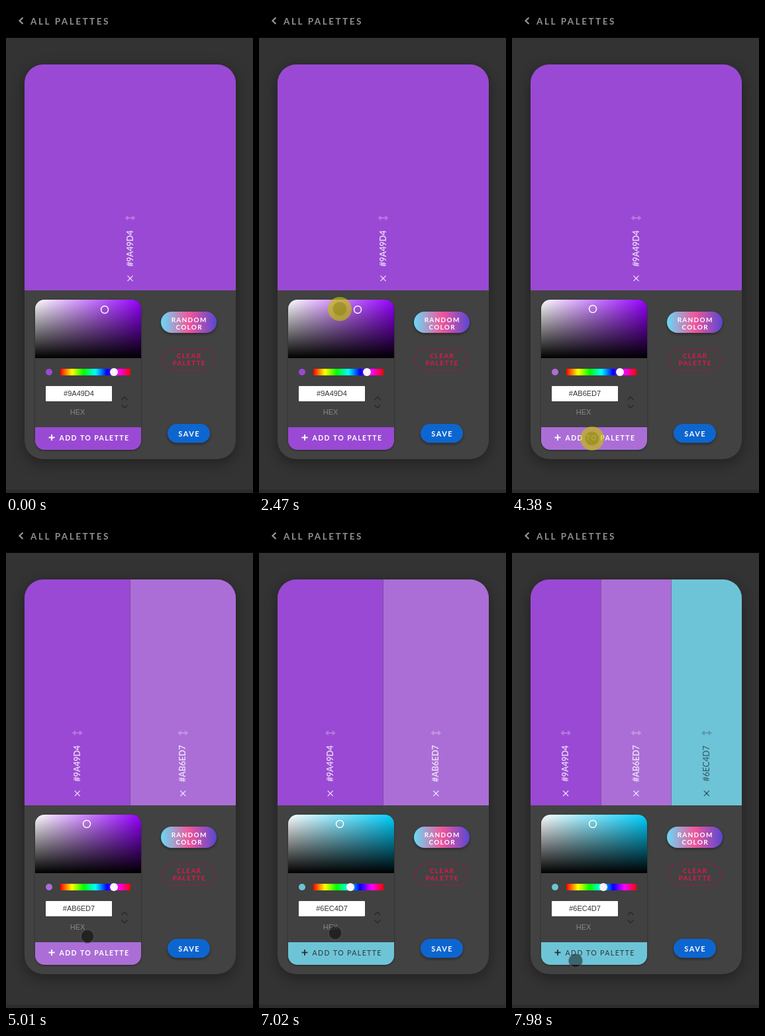
Write an HTML page with a canvas that moves like this. It is 373 by 733 pixels and loops after 8 s.

```html
<!DOCTYPE html>
<html lang="en">
<head>
<meta charset="utf-8">
<title>Palette editor</title>
<style>
html, body { margin: 0; width: 100%; height: 100%; overflow: hidden; background: #333; }
canvas { display: block; }
</style>
</head>
<body>
<canvas id="stage" width="373" height="733"></canvas>
<script>
const ctx = document.getElementById('stage').getContext('2d');
const LOOP = 8000;
const SANS = 'Lato, "Open Sans", sans-serif';
const ARIAL = '"Liberation Sans", Arial, sans-serif';

const VIOLET = [154, 73, 212], LILAC = [171, 110, 215], CYAN = [110, 196, 215];
const PICK_LILAC = 2530, PICK_CYAN = 6012;
const ADD_LILAC = 4390, ADD_CYAN = 7630;
const PRESSES = [2470, 4250, 6010, 7500];

// Pointer way points: time, x, y
const PATH = [
  [460, 291, 708], [760, 225, 610], [1210, 141, 490],
  [1280, 141, 490], [1350, 138, 483],
  [1750, 138, 483], [2150, 122, 456],
  [3440, 122, 456], [3680, 120, 540], [3910, 122, 639], [4180, 121, 651],
  [4720, 121, 651], [5010, 123, 625],
  [5080, 125, 622], [5500, 142, 580], [5880, 140, 555],
  [6010, 138, 551],
  [6690, 138, 551], [6760, 139, 527], [7020, 115, 620], [7360, 96, 662]
];

const clamp = v => Math.min(1, Math.max(0, v));
const mix = (a, b, k) => a + (b - a) * k;
const rgb = c => `rgb(${c.map(Math.round)})`;
const hex = c => '#' + c.map(v => v.toString(16).padStart(2, '0')).join('').toUpperCase();
const mixColor = (a, b, k) => a.map((v, i) => mix(v, b[i], k));

// cubic-bezier(.4, 0, .2, 1)
function ease(x) {
  x = clamp(x);
  let lo = 0, hi = 1, s = x;
  for (let i = 0; i < 18; i++) {
    s = (lo + hi) / 2;
    const bx = 1.2 * s * (1 - s) ** 2 + 0.6 * s * s * (1 - s) + s ** 3;
    if (bx < x) lo = s; else hi = s;
  }
  return 3 * s * s * (1 - s) + s ** 3;
}

function pointerAt(t) {
  let i = 0;
  while (i < PATH.length - 1 && PATH[i + 1][0] <= t) i++;
  const a = PATH[i], b = PATH[i + 1] || a;
  const k = b === a ? 0 : (t - a[0]) / (b[0] - a[0]);
  return [mix(a[1], b[1], k), mix(a[2], b[2], k)];
}

function box(x, y, w, h, r, fill) {
  ctx.beginPath();
  ctx.roundRect(x, y, w, h, r);
  if (fill) { ctx.fillStyle = fill; ctx.fill(); }
}

function disc(x, y, r, fill) {
  ctx.beginPath();
  ctx.arc(x, y, r, 0, 7);
  if (fill) { ctx.fillStyle = fill; ctx.fill(); }
}

function line(points, color, width) {
  ctx.beginPath();
  points.forEach(([x, y], i) => i ? ctx.lineTo(x, y) : ctx.moveTo(x, y));
  ctx.strokeStyle = color;
  ctx.lineWidth = width;
  ctx.stroke();
}

function text(str, x, y, font, color, align = 'center', spacing = 0) {
  ctx.font = font;
  ctx.fillStyle = color;
  ctx.letterSpacing = spacing + 'px';
  ctx.textAlign = align;
  ctx.textBaseline = 'alphabetic';
  ctx.fillText(str, x + (align === 'center' ? spacing / 2 : 0), y);
}

function shadow(color, blur, dy) {
  ctx.shadowColor = color;
  ctx.shadowBlur = blur;
  ctx.shadowOffsetY = dy;
}
const noShadow = () => shadow('transparent', 0, 0);

function gradient(x0, y0, x1, y1, stops) {
  const g = ctx.createLinearGradient(x0, y0, x1, y1);
  stops.forEach((c, i) => g.addColorStop(i / (stops.length - 1), c));
  return g;
}

function drawPage() {
  ctx.fillStyle = '#333';
  ctx.fillRect(0, 0, 373, 733);
  ctx.fillStyle = '#2e2b2e';
  ctx.fillRect(0, 728, 373, 5);
  ctx.fillStyle = '#000';
  ctx.fillRect(0, 0, 373, 48);
  line([[25.5, 17.5], [20.5, 22.3], [25.5, 27]], '#9d969c', 2.2);
  text('ALL PALETTES', 37, 28, `bold 13.5px ${SANS}`, '#958e94', 'left', 2.5);
  shadow('rgba(0,0,0,.38)', 22, 6);
  box(28, 88, 319, 594, 28, '#424242');
  noShadow();
}

function drawColumn(x, w, color, dark) {
  ctx.save();
  ctx.beginPath();
  ctx.rect(x, 88, w, 340);
  ctx.clip();
  ctx.fillStyle = rgb(color);
  ctx.fillRect(x, 88, w + 1, 340);
  ctx.translate(x + w / 2, 0);
  const ink = dark ? 'rgba(0,0,0,.52)' : 'rgba(255,255,255,.76)';
  const faint = dark ? 'rgba(0,0,0,.2)' : 'rgba(255,255,255,.26)';
  ctx.fillStyle = faint;
  ctx.beginPath();
  [[-8, 319], [-3, 315], [-3, 318], [3, 318], [3, 315], [8, 319],
   [3, 323], [3, 320], [-3, 320], [-3, 323]].forEach(p => ctx.lineTo(...p));
  ctx.fill();
  line([[-4, 406], [4, 414]], ink, 1.3);
  line([[4, 406], [-4, 414]], ink, 1.3);
  ctx.translate(4, 365);
  ctx.rotate(-Math.PI / 2);
  text(hex(color), 0, 0, `${dark ? 500 : 'bold'} 12.5px ${SANS}`, ink);
  ctx.restore();
}

function drawSwatches(t) {
  const parts = [
    [VIOLET, 1], [LILAC, ease((t - ADD_LILAC) / 330)], [CYAN, ease((t - ADD_CYAN) / 330)]
  ];
  const total = parts.reduce((sum, p) => sum + p[1], 0);
  ctx.save();
  box(28, 88, 319, 340, [28, 28, 0, 0]);
  ctx.clip();
  let x = 28;
  for (const [color, share] of parts) {
    const w = 319 * share / total;
    if (w > 0) drawColumn(x, w, color, color === CYAN);
    x += w;
  }
  ctx.restore();
}

function drawPicker(t) {
  const cyan = t >= PICK_CYAN, moved = t >= PICK_LILAC;
  const color = cyan ? CYAN : moved ? LILAC : VIOLET;
  const hue = cyan ? 191 : 275;
  const button = cyan ? mixColor(LILAC, CYAN, ease((t - PICK_CYAN) / 250))
                      : mixColor(VIOLET, LILAC, ease((t - PICK_LILAC) / 250));

  shadow('rgba(0,0,0,.45)', 3, 1);
  box(44, 442, 160, 226, 14, '#414141');
  noShadow();
  ctx.save();
  box(44, 442, 160, 226, 14);
  ctx.clip();
  ctx.fillStyle = gradient(44, 0, 204, 0, ['#fff', `hsl(${hue} 100% 50%)`]);
  ctx.fillRect(44, 442, 160, 88);
  ctx.fillStyle = gradient(0, 442, 0, 530, ['rgba(0,0,0,0)', '#000']);
  ctx.fillRect(44, 442, 160, 88);
  ctx.fillStyle = rgb(button);
  ctx.fillRect(44, 634, 160, 34);
  ctx.restore();

  disc(moved ? 122 : 149, moved ? 456 : 457, 5.5);
  ctx.strokeStyle = '#fff';
  ctx.lineWidth = 1.4;
  ctx.stroke();

  disc(65, 551, 5, rgb(color));
  const rainbow = Array.from({ length: 7 }, (_, i) => `hsl(${i * 60} 100% 50%)`);
  ctx.fillStyle = gradient(82, 0, 188, 0, rainbow);
  ctx.fillRect(82, 546, 106, 10);
  disc(cyan ? 138 : 163, 551, 6, '#f8f4f8');

  box(60, 572, 100, 23, 1, '#fff');
  text(hex(color), 110, 587, `11px ${ARIAL}`, '#333');
  text('HEX', 108, 615, `11px ${ARIAL}`, '#8c868b');
  line([[174.5, 593], [179, 588.5], [183.5, 593]], '#292929', 1.5);
  line([[174.5, 600.5], [179, 605], [183.5, 600.5]], '#292929', 1.5);

  const ink = cyan ? 'rgba(32,32,32,.8)' : '#fff';
  line([[64.5, 649.5], [73.5, 649.5]], ink, 2);
  line([[69, 645], [69, 654]], ink, 2);
  text('ADD TO PALETTE', 80.5, 653.5, `${cyan ? 500 : 'bold'} 10.5px ${SANS}`, ink, 'left', 1.4);
}

function drawButtons() {
  const font = `bold 10px ${SANS}`;
  shadow('rgba(0,0,0,.4)', 4, 2);
  box(234, 460, 84, 32, 16, gradient(234, 0, 318, 0, ['#66dbf5', '#f2569c', '#5747d3']));
  box(244, 629, 64, 28.5, 14.25, '#0d66d0');
  noShadow();
  text('RANDOM', 276, 475.5, font, '#fff', 'center', 1.3);
  text('COLOR', 276, 486.5, font, '#fff', 'center', 1.3);
  box(235.5, 516, 80, 32, 16);
  ctx.strokeStyle = '#8f2049';
  ctx.lineWidth = 1;
  ctx.stroke();
  text('CLEAR', 276, 529.5, font, '#e2174d', 'center', 1.4);
  text('PALETTE', 276, 540.5, font, '#e2174d', 'center', 1.3);
  text('SAVE', 276, 647.5, `bold 11px ${SANS}`, '#fff', 'center', 1.5);
}

function drawPointer(t) {
  if (t < 460) return;
  const [x, y] = pointerAt(t);
  disc(x, y, 10, 'rgba(0,0,0,.48)');
  ctx.strokeStyle = 'rgba(85,85,85,.6)';
  ctx.lineWidth = 1.6;
  ctx.stroke();
  if (PRESSES.some(p => t >= p && t < p + 140)) disc(x, y, 18, 'rgba(200,194,4,.65)');
}

function draw(now) {
  const t = now % LOOP;
  drawPage();
  drawSwatches(t);
  drawPicker(t);
  drawButtons();
  drawPointer(t);
}

let start;
function tick(now) {
  start ??= now;
  draw(now - start);
  requestAnimationFrame(tick);
}
requestAnimationFrame(tick);
</script>
</body>
</html>
```
